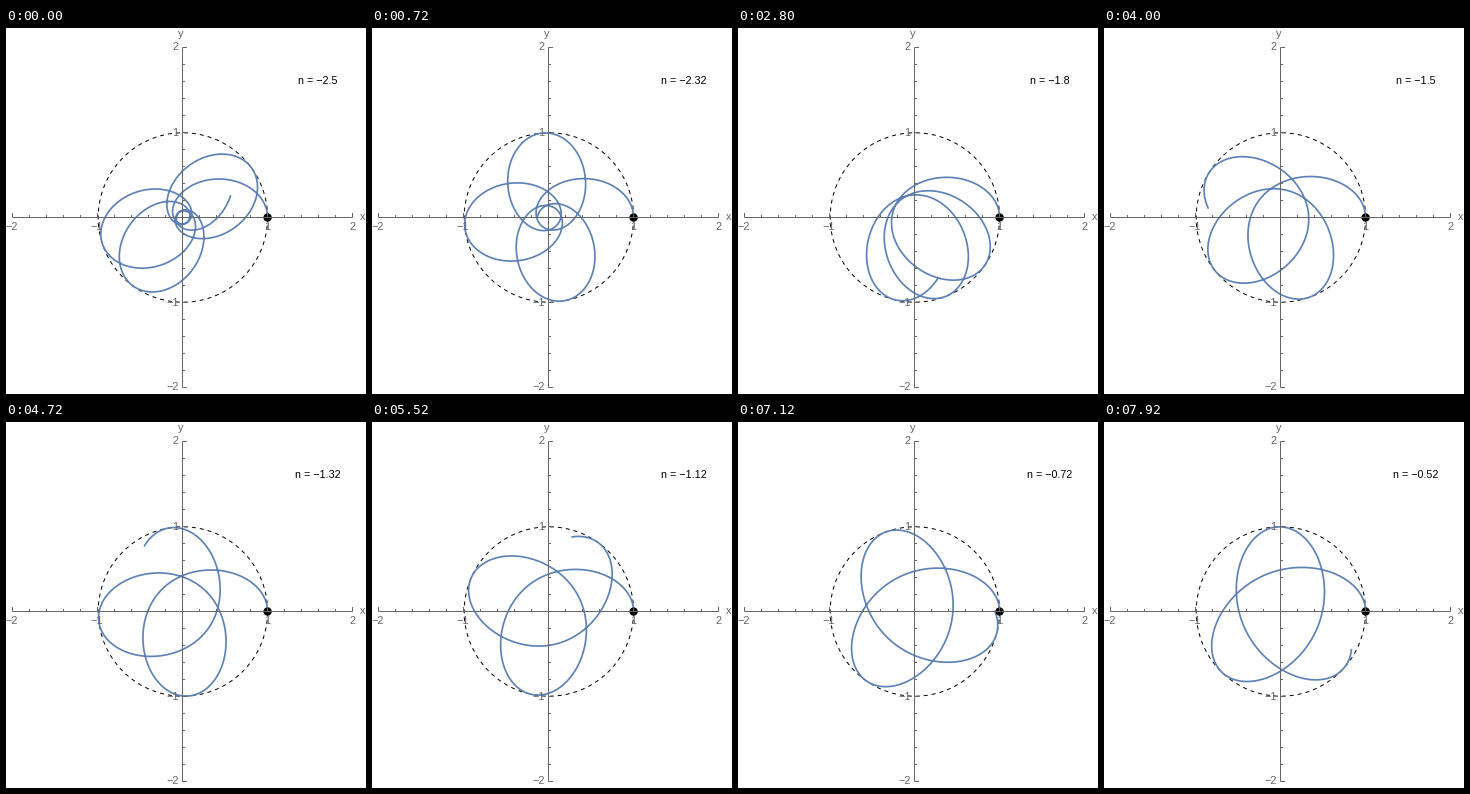
Recreate the animation shown at these times as a matplotlib script. Size 360 by 366 pixels, loop 8 s.

```python
import matplotlib.pyplot as plt
import numpy as np
from matplotlib.animation import FuncAnimation

W, H, DPI = 360, 366, 100
AXIS_X, AXIS_Y, TICK_UNIT = 176.5, 189.5, 85   # axes sit on whole pixels
CX, CY, UNIT = 176.9, 189.5, 84.7              # curves do not
FRAMES, INTERVAL = 100, 80
SPEED, DURATION, STEPS, KEEP = 0.6, 10, 20000, 4
BLUE, GRAY = "#5e81b5", "#666666"

plt.rcParams["font.family"] = "Liberation Sans"


def px(size):
    return size * 72 / DPI


def acceleration(pos, power):
    return -pos * (pos[0] ** 2 + pos[1] ** 2) ** ((power - 1) / 2)


def integrate_orbits(powers):
    """Runge-Kutta for all force laws a = -r^n at once."""
    dt = DURATION / STEPS
    pos = np.array([np.ones_like(powers), np.zeros_like(powers)])
    vel = np.array([np.zeros_like(powers), np.full_like(powers, SPEED)])
    path = [pos]
    for step in range(1, STEPS + 1):
        a1 = acceleration(pos, powers)
        v2 = vel + a1 * dt / 2
        a2 = acceleration(pos + vel * dt / 2, powers)
        v3 = vel + a2 * dt / 2
        a3 = acceleration(pos + v2 * dt / 2, powers)
        v4 = vel + a3 * dt
        a4 = acceleration(pos + v3 * dt, powers)
        pos = pos + dt / 6 * (vel + 2 * v2 + 2 * v3 + v4)
        vel = vel + dt / 6 * (a1 + 2 * a2 + 2 * a3 + a4)
        if step % KEEP == 0:
            path.append(pos)
    return np.array(path)


def to_stage(x, y):
    return CX + UNIT * x, CY - UNIT * y


powers = -2.5 + 0.02 * np.arange(FRAMES)
orbits = integrate_orbits(powers)

fig = plt.figure(figsize=(W / DPI, H / DPI), dpi=DPI, facecolor="white")
ax = fig.add_axes([0, 0, 1, 1])
ax.set_xlim(0, W)
ax.set_ylim(H, 0)
ax.axis("off")


def axis_line(xs, ys):
    ax.plot(xs, ys, color=GRAY, lw=px(1), solid_capstyle="butt", snap=False, zorder=5)


def label(x, y, text, align="center", color=GRAY, size=11):
    return ax.text(x, y, text, fontsize=px(size), color=color, ha=align,
                   va="baseline", zorder=6)


def draw_axes():
    reach = 2 * TICK_UNIT
    axis_line([AXIS_X - reach, AXIS_X + reach], [AXIS_Y, AXIS_Y])
    axis_line([AXIS_X, AXIS_X], [AXIS_Y - reach, AXIS_Y + reach])
    for k in range(-10, 11):
        if k == 0:
            continue
        offset = k * TICK_UNIT / 5
        size = 4.5 if k % 5 == 0 else 2.5
        axis_line([AXIS_X + offset] * 2, [AXIS_Y, AXIS_Y - size])
        axis_line([AXIS_X, AXIS_X + size], [AXIS_Y - offset] * 2)
        if k % 5 == 0:
            text = str(k // 5).replace("-", "\u2212")
            label(AXIS_X + offset - 0.5, 202, text)
            label(172.7, AXIS_Y - offset + 3, text, "right")
    label(356.5, 192, "x")
    label(175, 9, "y")


angle = np.linspace(0, 2 * np.pi, 361)
ax.plot(*to_stage(np.cos(angle), np.sin(angle)), color="black", lw=px(1),
        dashes=(4, 4), dash_capstyle="butt", zorder=2)
orbit, = ax.plot([], [], color=BLUE, lw=px(1.7), zorder=3)
ax.add_patch(plt.Circle(to_stage(1, 0), 4.2, color="black", lw=0, zorder=4))
draw_axes()
caption = label(311.5, 56.5, "", color="black", size=10.7)


def update(frame):
    orbit.set_data(*to_stage(orbits[:, 0, frame], orbits[:, 1, frame]))
    value = f"{powers[frame]:.2f}".rstrip("0").replace("-", "\u2212")
    caption.set_text(f"n = {value}")
    return orbit, caption


animation = FuncAnimation(fig, update, frames=FRAMES, interval=INTERVAL,
                          repeat=True, repeat_delay=0)
plt.show()
```
